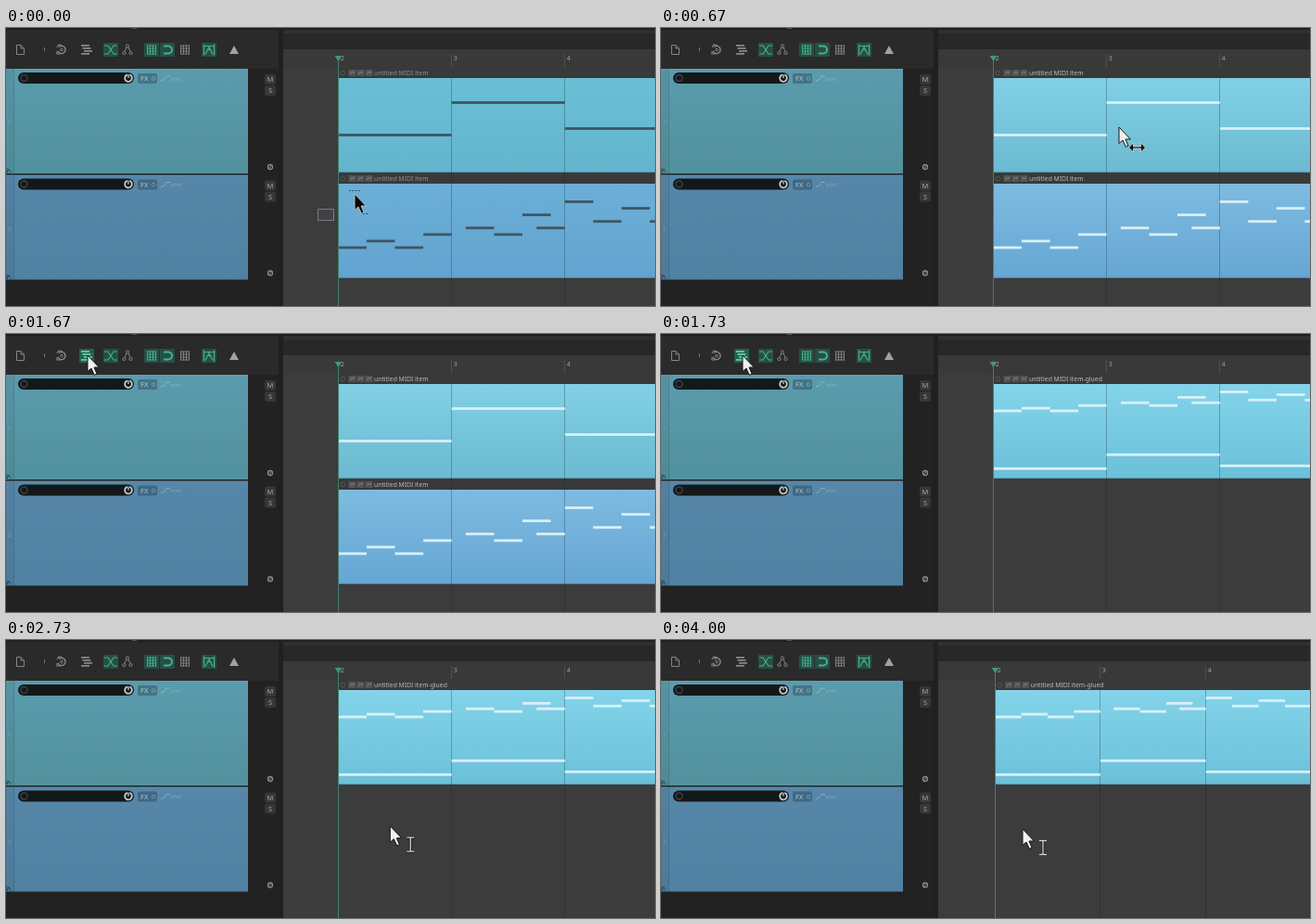
Write an HTML page with a canvas that moves like this. It is 700 by 300 pixels and loops after 4070 ms.

```html
<!DOCTYPE html>
<html lang="en">
<meta charset="utf-8">
<title>Gluing MIDI items</title>
<style>
html, body { margin: 0; width: 700px; height: 300px; overflow: hidden; background: #222 }
canvas { display: block }
</style>
<canvas id="stage" width="700" height="300"></canvas>
<script>
const c = document.getElementById('stage').getContext('2d');
const LOOP = 4070, FPS = 15, SELECT = 10, GLUE = 26, ZOOM = 59;
const FONT = '"Noto Sans", "Open Sans", sans-serif';
const GREY = '#868686', GREEN = '#49b08f';

// Pointer curves: first step, last step, two control points, end point
const home = [376, 179];
const moves = [
  [0, 8, [426, 148], [490, 108], [494, 107]],
  [10, 18, [494, 107], [88, 23], [88, 23]],
  [26, 39, [70, 130], [131, 322], [415, 245]],
  [39, 49, [435, 140], [330, 205], [388, 228]],
  [49, 54, [350, 215], [365, 170], [390, 204]]
];

// Each note is start beat, length and height on the stage
const chords = [115.5, 80.5, 108.5].map((y, i) => [i * 4, 4, y]);
const melody = [...'010232537464'].map((step, i) =>
  [i + (i > 3 && i < 7 ? .5 : 0), 1, 237 - step * 7.07]);

function box(x, y, w, h, fill) { c.fillStyle = fill; c.fillRect(x, y, w, h); }

function pill(x, y, w, h, r, fill) {
  c.beginPath(); c.roundRect(x, y, w, h, r);
  c.fillStyle = fill; c.fill();
}

function glyph(x, y, d, stroke, width = 1, fill) {
  const p = new Path2D(d);
  c.save(); c.translate(x, y);
  if (fill) { c.fillStyle = fill; c.fill(p); }
  if (stroke) { c.strokeStyle = stroke; c.lineWidth = width; c.stroke(p); }
  c.restore();
}

function ring(x, y, r, color, width = 1, from = 0, to = 7) {
  c.beginPath(); c.arc(x, y, r, from, to);
  c.strokeStyle = color; c.lineWidth = width; c.stroke();
}

function text(s, x, y, size, color) {
  c.font = size + 'px ' + FONT; c.fillStyle = color; c.fillText(s, x, y);
}

function fade(y, h, top, bottom) {
  const g = c.createLinearGradient(0, y, 0, y + h);
  g.addColorStop(0, top); g.addColorStop(1, bottom);
  return g;
}

function mouseAt(n) {
  let at = home;
  for (const [from, to, p, q, end] of moves) {
    if (n < from) break;
    const k = Math.min(1, (n - from) / (to - from)), r = 1 - k;
    at = at.map((a, i) =>
      r ** 3 * a + 3 * r * r * k * p[i] + 3 * r * k * k * q[i] + k ** 3 * end[i]);
  }
  return at;
}

function gridIcon(x, y, color) {
  for (let i = -4.5; i < 5; i += 3)
    glyph(x, y, `M-5 ${i}H5M${i} -5V5`, color, .9);
}

function toolbar(hover) {
  box(0, 0, 294, 44, '#2a2a2a');
  box(0, 0, 700, 2, '#202020');
  box(136, 0, 5, 1, '#555');
  glyph(15, 23, 'M-3.5 -4.5H1L4.5 -1V5.5H-3.5ZM1 -4.5V-1H4.5', GREY);
  box(41, 21, 1, 4, '#777');
  ring(60, 23.5, 4, GREY, 1.5, -2.3, 2.8);
  ring(60, 23.5, 1.3, GREY);
  glyph(60, 23, 'M-5 -2L-3 -5L1 -4M-5 2V5H-1', GREY, 1.2);
  for (const x of [105, 149, 166, 211]) box(x, 16, 16, 15, '#264f45');
  if (hover) box(79, 16, 16, 15, '#266050');
  for (let i = 0; i < 4; i++)
    box(81 + i % 3 * 1.5, 18 + i * 3, 9, 1.8, hover ? '#62c9a8' : GREY);
  for (const s of [-1, 1])
    glyph(113, 23.5, `M-7 ${-s * 4.5}H-3L3 ${s * 4.5}H7`, GREEN, 1.1);
  for (const [x, y] of [[131, 19.5], [127.5, 27], [134.5, 27]]) ring(x, y, 1.6, GREY);
  glyph(131, 23, 'M-1 -2L-3 2M1 -2L3 2', GREY);
  gridIcon(157, 23.5, GREEN);
  glyph(175, 23.5, 'M-5 -4H0A4 4 0 0 1 0 4H-5', GREEN, 2);
  gridIcon(193, 23.5, GREY);
  glyph(219, 23.5, 'M-5.5 -6V6M5.5 -6V6M-6 -4H6M-4 5L0 -3L4 5M-2 0H2', GREEN, 1.2);
  glyph(246, 19, 'M0 0L5 9H-5Z', null, 0, '#a2a2a2');
}

function track(y, n, top, bottom) {
  box(0, y, 261, 113, fade(y, 113, top, bottom));
  box(0, y, 8, 113, 'rgba(0,0,0,.05)');
  box(8, y, 1, 113, 'rgba(0,0,0,.15)');
  box(0, y, 261, 1, 'rgba(255,255,255,.06)');
  text(n, 2, y + 60, 6, 'rgba(255,255,255,.25)');
  glyph(1, y + 107, 'M0 0V5L2 1L4 5', 'rgba(0,0,0,.4)');
  pill(13, y + 4, 125, 12, 6, '#14181a');
  ring(19.5, y + 10, 3.5, '#3c4144', 1.4);
  ring(132, y + 10, 3.8, '#c6cacc', 1.8, -1.2, 4.4);
  glyph(132, y + 6, 'V4', '#c6cacc', 1.3);
  glyph(132, y + 6, 'M0 0V4', '#c6cacc', 1.3);
  pill(142, y + 5, 21, 11, 2, 'rgba(32,55,70,.38)');
  text('FX', 145, y + 13.2, 7.5, 'rgba(215,232,238,.75)');
  ring(159, y + 10.5, 1.8, 'rgba(220,235,240,.4)', .8);
  glyph(167, y + 8, 'M0 5L3 4L6 0H10', 'rgba(220,235,240,.35)');
  text('trim', 178, y + 12.5, 5.5, 'rgba(220,235,240,.35)');
  for (const [s, x, d] of [['M', 281.6, 6], ['S', 283, 18]]) {
    pill(279, y + d, 12, 11, 2, '#373737');
    text(s, x, y + d + 8.4, 7.5, '#a6a6a6');
  }
  ring(285, y + 106, 2.5, '#8c8c8c', 1.3);
  glyph(283, y + 108, 'M0 0L4 -4', '#8c8c8c');
}

function item(y, x0, name, selected, top, bottom) {
  box(x0, y, 700 - x0, 11, '#393939');
  ring(x0 + 5, y + 5.5, 2.3, '#555');
  for (let i = 0; i < 3; i++) {
    box(x0 + 11 + i * 9, y + 2, 8, 7, '#535353');
    glyph(x0 + 13 + i * 9, y + 7, 'M0 0L1.5 -3L3.5 -1L4 -3.5', '#858585', .8);
  }
  text(name, x0 + 38.6, y + 8, 6.8, selected ? '#bdbdbd' : '#929292');
  box(x0, y + 11, 700 - x0, 102, fade(y + 11, 102, top, bottom));
  box(x0, y + 112, 700 - x0, 1, 'rgba(0,0,0,.2)');
}

function arrange(n) {
  const glued = n >= GLUE, selected = n >= SELECT;
  const z = Math.max(0, n - ZOOM + 1) / 2;
  const x0 = 358.4 + 1.7 * z, beat = 30.55 - 2.1 * z;
  const bar = i => Math.floor(x0 + beat * 4 * i) + .5;

  box(294, 2, 406, 298, '#202020');
  box(299, 2, 401, 4, '#303030');
  box(299, 6, 401, 17, '#282828');
  box(299, 23, 401, 21, '#393939');
  box(299, 43, 401, 257, '#3c3c3c');
  for (let i = 0; i < 3; i++) {
    glyph(bar(i), 28, 'M0 0V14', '#505050');
    text(i + 2, bar(i) + 2.3, 35, 7, '#a0a0a0');
    if (i) glyph(bar(i), 43, 'M0 0V257', '#323232');
  }

  if (glued) item(43, x0, 'untitled MIDI item-glued', true, '#83d4ea', '#6bc0d9');
  else {
    const name = 'untitled MIDI item';
    item(43, x0, name, selected, ...(selected ? ['#81d0e5', '#6bbad1'] : ['#6abfd5', '#63b5cd']));
    item(157, x0, name, selected, ...(selected ? ['#7ebbe1', '#66a6d3'] : ['#6bafd7', '#62a4d0']));
  }
  for (let i = 1; i < 3; i++)
    glyph(bar(i), 54, `M0 0V${glued ? 102 : 216}`, 'rgba(20,50,65,.32)');

  const ink = selected ? '#d9f0f7' : '#3e5662';
  const notes = (list, row) => list.forEach(([b, len, y]) =>
    box(x0 + b * beat, row(y) - 1.4, len * beat, 2.8, ink));
  notes(chords, y => glued ? 145.3 + (y - 115.5) * .43 : y);
  notes(melody, y => glued ? 83 + (y - 237) * .414 : y);

  glyph(bar(0), 30, 'M0 0V270', '#437f6d');
  glyph(bar(0), 30, 'M-4 0H4L0 6Z', null, 0, '#45957b');
}

function marquee(x, y) {
  const left = 336.5, bottom = 207.5;
  const right = Math.round(x - 23) + .5, top = Math.round(y + 16) + .5;
  box(left, top, right - left, bottom - top, 'rgba(72,76,84,.32)');
  glyph(0, 0, `M${left} ${top}H${right}V${bottom}H${left}Z`, '#7d7d7d');
  if (right > 359) glyph(0, 0, `M359 ${top}H${right}V${bottom}`, '#111', 1.3);
}

function pointer(x, y, n) {
  const dark = n < SELECT || n > 30 && n < 34;
  glyph(x, y, 'M0 0V17.5L4 14L7.3 21.3L10 20L7 13H12.3Z',
    dark ? '#b4c0c4' : '#151515', 1, dark ? '#080808' : '#f0f0f0');
  if (n < SELECT) {
    c.setLineDash([1.5, 2]);
    glyph(x, y, 'M-6 -3.5H6M9 21.5H14', '#333');
    c.setLineDash([]);
  } else if (n < 12) {
    glyph(x + 19.5, y + 22, 'M-9 0L-4 -5V-1H4V-5L9 0L4 5V1H-4V5Z', '#ddd', .8, '#111');
  } else if (n > 36) {
    for (const [color, width] of [['#1c1c1c', 3], ['#d4d4d4', 1.3]])
      glyph(x + 22, y + 20, 'M-4 -7.5H4M0 -7.5V7.5M-4 7.5H4', color, width);
  }
}

function draw(now) {
  const n = Math.min(60, Math.floor((now % LOOP + 4) * FPS / 1000));
  const [x, y] = mouseAt(n);
  box(0, 0, 700, 300, '#222');
  arrange(n);
  toolbar(n >= 18 && n < 28);
  track(44, '1', '#5a9bad', '#52919d');
  track(158.5, '2', '#5687a9', '#5081a2');
  if (n < SELECT) marquee(x, y);
  pointer(x, y, n);
  requestAnimationFrame(() => draw(performance.now() - start));
}

const start = performance.now();
draw(0);
</script>
</html>
```
